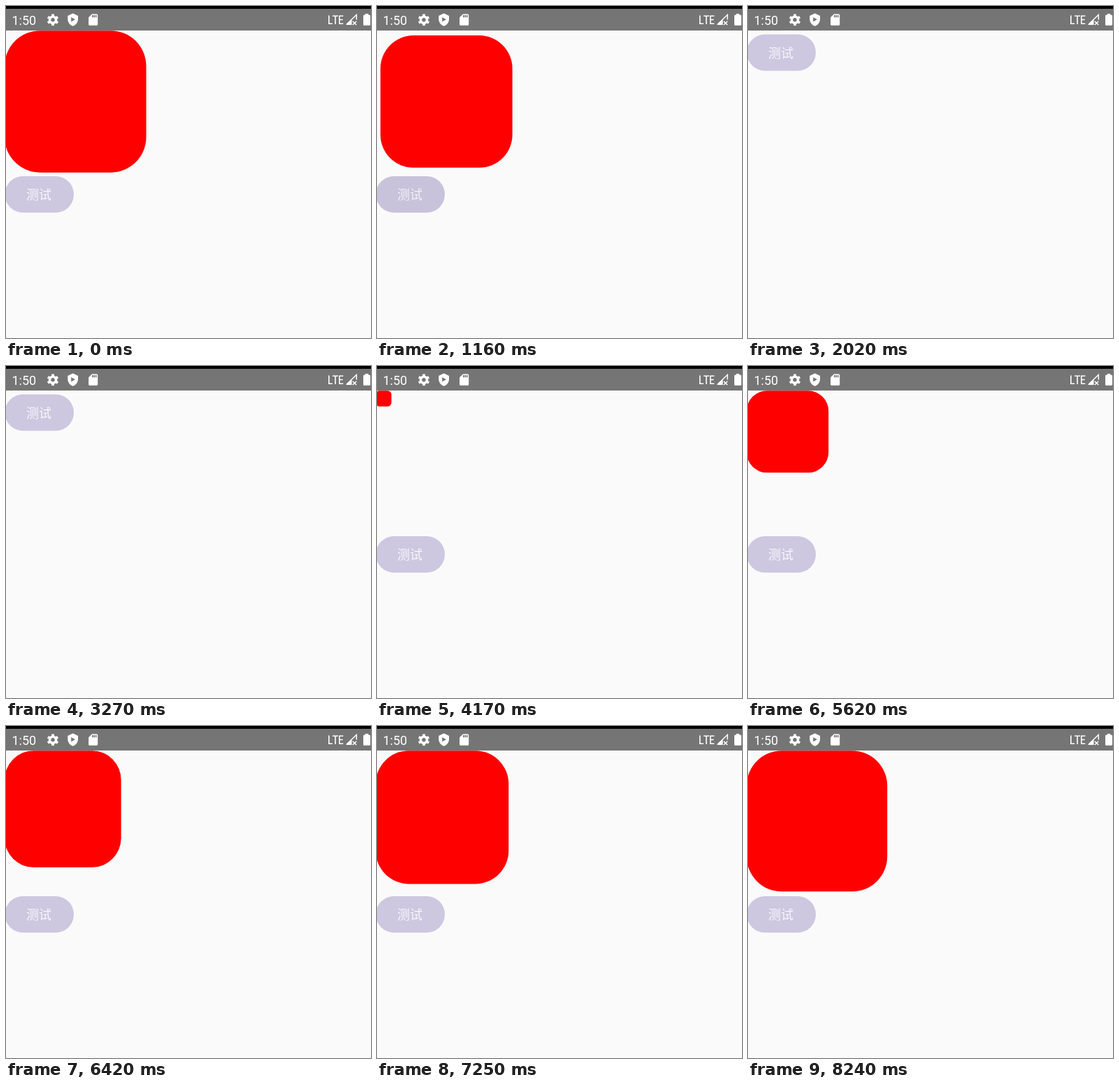
Animation, 522 px wide and 474 px high, one loop 8280 ms. Source, as an HTML page:

```html
<!DOCTYPE html>
<html lang="zh-CN">
<head>
<meta charset="utf-8">
<title>Scale in and out</title>
<style>
  html, body { margin: 0; width: 100%; height: 100%; overflow: hidden; background: #fafafa; }
  svg { display: block; }
  .clock { font: 18px Roboto, sans-serif; }
  .label { font: 18px "Noto Sans CJK SC", "Noto Sans CJK", sans-serif; text-anchor: middle; }
</style>
</head>
<body>
<svg width="522" height="474" viewBox="0 0 522 474">
  <rect width="522" height="474" fill="#fafafa"/>

  <rect id="box" fill="#f00"/>

  <g id="button">
    <rect x="-1.7" y="243" width="98.7" height="52" rx="26" fill="#cdc7e0"/>
    <text class="label" x="47" y="276" fill="#f8f7fb">测试</text>
    <rect id="ripple" x="-1.7" y="243" width="98.7" height="52" rx="26"/>
  </g>

  <rect width="522" height="35" fill="#757575"/>
  <rect width="522" height="4"/>
  <g fill="#fff">
    <text class="clock" x="8.5" y="27">1:50</text>

    <!-- settings -->
    <g fill="none" stroke="#fff" transform="translate(67 19.8)">
      <circle r="4.5" stroke-width="3.6"/>
      <circle r="6.6" stroke-width="3.4" pathLength="12" stroke-dasharray="1 1" stroke-dashoffset="-.5"/>
    </g>

    <!-- shield -->
    <g transform="translate(85.8 9.8) scale(.82)">
      <path d="M12 1L3 5v6c0 5.55 3.84 10.74 9 12 5.16-1.26 9-6.45 9-12V5z"/>
      <path d="M9 7.5v8l7-4z" fill="#757575"/>
    </g>

    <!-- memory card -->
    <path fill-rule="evenodd" transform="translate(114.8 9.8) scale(.82)"
      d="M18 2h-8L4 8v12a2 2 0 0 0 2 2h12a2 2 0 0 0 2-2V4a2 2 0 0 0-2-2zM12 8h-2V4h2zM15 8h-2V4h2zM18 8h-2V4h2z"/>

    <!-- network type -->
    <path fill="none" stroke="#fff" stroke-width="1.6"
      d="M461.8 13.5V25.2H467M467 14.3H475M471 14.3V26M482.3 14.3H476.8V25.2H482.3M476.8 19.5H481.6"/>

    <!-- signal -->
    <path d="M486 27L494.5 18.5V27z"/>
    <path fill="none" stroke="#fff" stroke-width="1.5"
      d="M487 26.3L501.3 12.5V19.5M495.8 21.8L501.2 27M501.2 21.8L495.8 27"/>

    <!-- battery -->
    <path d="M513.8 11h4.4v1.8h1.5a1.3 1.3 0 0 1 1.3 1.3v12.4a1.3 1.3 0 0 1-1.3 1.3h-7.4a1.3 1.3 0 0 1-1.3-1.3V14.1a1.3 1.3 0 0 1 1.3-1.3h1.5z"/>
  </g>
</svg>
<script>
const LOOP = 8280;
const FULL = { x: -2, y: 35.2, size: 202.5 };
const EXIT = { start: 1009, duration: 1000 };
const ENTER = { start: 3806, shown: 3840, duration: 5000, from: 0.1 };
const PRESSES = [970, 3780];

const [box, button, ripple] = ['box', 'button', 'ripple'].map(id => document.getElementById(id));
const clamp = v => Math.min(1, Math.max(0, v));

// cubic-bezier(.4, 0, .2, 1)
function ease(x) {
  let low = 0, high = 1;
  for (let i = 0; i < 24; i++) {
    const p = (low + high) / 2, q = 1 - p;
    if (1.2 * p * q * q + 0.6 * p * p * q + p ** 3 < x) low = p;
    else high = p;
  }
  return low * low * (3 - 2 * low);
}

const progress = (t, { start, duration }) => ease(clamp((t - start) / duration));

// pivot: 0 scales about the top left corner, 0.5 about the centre
function placeBox(scale, pivot) {
  const size = FULL.size * scale;
  const inset = (FULL.size - size) * pivot;
  const attributes = { x: FULL.x + inset, y: FULL.y + inset, width: size, height: size, rx: size / 4 };
  for (const name in attributes) box.setAttribute(name, attributes[name]);
}

function pressStrength(t) {
  return clamp(t / 75) * clamp((375 - t) / 150);
}

function draw(t) {
  const entering = t >= ENTER.shown;
  const gone = !entering && t >= EXIT.start + EXIT.duration;

  if (entering) placeBox(ENTER.from + (1 - ENTER.from) * progress(t, ENTER), 0);
  else placeBox(1 - progress(t, EXIT), 0.5);

  box.setAttribute('visibility', gone ? 'hidden' : 'visible');
  button.setAttribute('transform', `translate(0 ${gone ? -FULL.size : 0})`);
  ripple.setAttribute('opacity', 0.025 * Math.max(...PRESSES.map(start => pressStrength(t - start))));
}

const begin = performance.now();
function frame() {
  draw((performance.now() - begin) % LOOP);
  requestAnimationFrame(frame);
}
frame();
</script>
</body>
</html>
```
